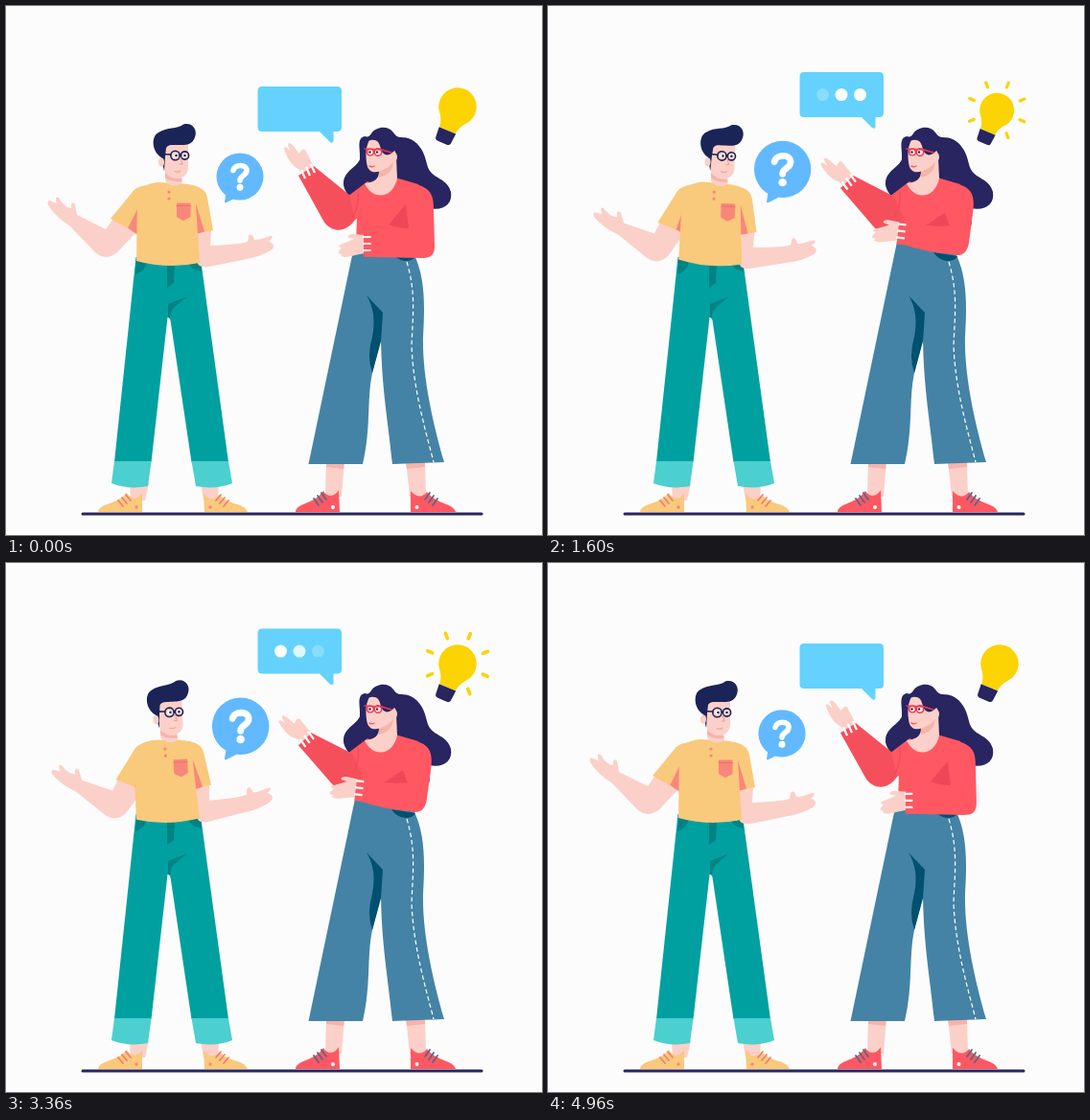
Write an HTML page that moves like this. It is 559 px wide and 552 px high and loops after 5000 ms.

```html
<!DOCTYPE html>
<html lang="en">
<head>
<meta charset="utf-8">
<title>Conversation</title>
<style>
  html, body { margin: 0; width: 100%; height: 100%; overflow: hidden; background: #fcfcfc; }
  svg { display: block; width: 100vw; height: 100vh; }
  .skin { fill: #fbd0c8; }
  .blush { fill: #f6b3aa; }
  .ink { fill: #282560; }
  .navy { fill: #1b2456; }
  .red { fill: #ff5862; }
  .rose { fill: #ee4757; }
  .sand { fill: #f9c97c; }
  .coral { fill: #f9867a; }
  .teal { fill: #00a0a0; }
  .pine { fill: #018284; }
  .mint { fill: #4bcfcf; }
  .denim { fill: #4483a5; }
  .deep { fill: #00506f; }
  .sky { fill: #62b9ff; }
  .white { fill: #fff; }
  .line { fill: none; stroke-linecap: round; stroke-linejoin: round; }
</style>
</head>
<body>
<svg viewBox="0 0 559 552" preserveAspectRatio="none">
  <path class="line" d="M80 530H496" stroke="#282560" stroke-width="3"/>

  <!-- man: legs -->
  <path class="skin" d="M129 498H149L145 516H130ZM203 498H222L221 516H206Z"/>
  <path class="sand" d="M96 528C98 518 115 521 126 508C131 517 139 514 142 508L142 528ZM207 528L206 508C210 515 217 517 223 510C232 521 248 518 252 528Z"/>
  <path class="line" d="M117 516l5 6M121 513l5 6M125 510l5 6M232 516l-5 6M228 513l-5 6M224 510l-5 6" stroke="#f47f72" stroke-width="1.8"/>
  <circle cx="136" cy="523" r="1.7" class="coral"/><circle cx="213" cy="523" r="1.7" class="coral"/>
  <path class="teal" d="M135.500 262L203 264L232 476H193.500L171.500 328Q170 323 168.500 325L151.500 476H113Z"/>
  <path class="mint" d="M113 475H151.500L148 501Q128 505 110 498ZM193.500 475H232L236 498Q219 505 198 501Z"/>
  <path class="pine" d="M136 264H147Q147 276 135 280ZM168 270H176L175 289L168 294ZM189 303L169 311V325L171 326Q171 317 177 313ZM189 266H203L204 277Q193 276 189 266Z"/>

  <!-- man: upper body -->
  <g id="manArm">
    <path class="skin" d="M113 220L104 233L74 218L72 207C70 203 67 206 68 211C62 210 58 205 55 200C52 198 51 201 53 206L45 203C43 204 43 207 45 209C50 217 57 223 66 229L93 257C100 264 110 263 116 257L135 237Z"/>
    <path class="coral" d="M139 204L126 231L139 240Z"/>
    <path class="sand" d="M148 187C139 188 135 190 132 194L109 222L127 232L140 206Z"/>
  </g>
  <g id="man">
    <path class="skin" d="M200 236L214 234L213 250C230 249 242 249 252 246L253 240C255 237 258 239 259 244C266 244 271 241 276 240C279 240 278 243 274 245L278 248C280 250 279 253 276 255C266 261 258 263 246 265L212 272C204 273 200 271 200 268Z"/>
    <path class="sand" d="M158 184C149 185 142 188 137 195L136 266Q168 275 202 268L200 237L216 234L210 200C208 190 200 187 182 185Z"/>
    <path class="coral" d="M198 206L207 235.500L200 237.500Z"/>
    <path class="coral" d="M178 205.500H192.500V220L185 224L178 220Z"/>
    <path class="line" d="M178 208.500H192.500" stroke="#ef7268"/>
    <circle cx="170" cy="194" r="1.6" class="coral"/><circle cx="170" cy="201" r="1.6" class="coral"/>
    <path class="skin" d="M166 168L166 182C170 189 181 189 184 184L183 174Z"/>
    <path class="blush" d="M166 174Q172 181 183 180L183 183Q171 184 166 179Z"/>
    <path class="skin" d="M160 146L162 160C163 171 169 179 176 180C185 180 190 176 190 168V142Z"/>
    <path class="navy" d="M162 158C152 152 151 136 159 132C168 126 178 129 185 123.500C195 121 200 130 197 137C194 146 186 145 180 145C174 145 169 144 167 148L166 157L165 172Z"/>
    <ellipse cx="162" cy="163" rx="3" ry="4.500" class="skin"/>
    <ellipse cx="177" cy="156" rx="2.600" ry="2" class="white"/><ellipse cx="186.500" cy="156" rx="2.400" ry="2" class="white"/>
    <g class="line" stroke="#1b2456" stroke-width="1.6">
      <circle cx="176.500" cy="156" r="4.700"/><circle cx="186.500" cy="156" r="4.100"/>
      <path d="M162 154.500L172 155M181 155.500h1.500"/>
    </g>
    <circle cx="177.500" cy="156" r="1.300" class="navy"/><circle cx="186.500" cy="156" r="1.300" class="navy"/>
    <path class="line" d="M182 158l2 7h-3M176 172.500q4 1.500 6-.500" stroke="#f0a299" stroke-width="1.1"/>
  </g>

  <!-- woman: hair and legs -->
  <path class="ink" d="M369 160C370 150 365 138 374 136C378 137 379 136 381 133C386 126 398 124 404 132C406 135 408 137 412 137C428 137 436 150 439 165C443 182 459 177 464 194C466 207 456 214 441 211Q445 228 436 240L380 212C364 208 351 194 352 184C353 172 366 168 369 160Z"/>
  <path class="skin" d="M334 474H353L350 512H333ZM417 474H437L438 512H421Z"/>
  <path class="blush" d="M334 476H353L352 483L334 481ZM417 476H437V481L418 483Z"/>
  <path class="red" d="M302 528C303 518 320 521 331 506C336 514 344 511 347 505L348 528ZM422 528L422 506C427 512 434 514 439 507C450 521 466 518 469 528Z"/>
  <path class="line" d="M321 514l5 7M325 511l5 7M329 508l5 7M450 514l-5 7M446 511l-5 7M442 508l-5 7" stroke="#53698c" stroke-width="1.8"/>
  <circle cx="341" cy="523" r="2" class="white"/><circle cx="428.500" cy="523" r="2" class="white"/>
  <path class="denim" d="M364 246L425 258C437 282 437 310 435 345C434 385 445 435 457 476L403 478C398 430 392 400 391 348L382 383C376 412 381 440 372 478H315.500Z"/>
  <path class="deep" d="M376 302L393 320L391 350L382 383Q376 366 382 345Q387 320 376 302ZM402 257L427 261Q425 266 416 266Q407 265 402 257Z"/>
  <path d="M418 267C428 300 424 325 423 355C425 400 436 437 446 476" fill="none" stroke="#fff" stroke-width="1.2" stroke-dasharray="4.500 3"/>

  <!-- woman: upper body -->
  <path class="red" d="M377 183L356 199L350 230L366 222L365 247Q395 258 425 259L436 215L430 186L406 179L392 190Z"/>
  <g id="foreArm">
    <path class="skin" d="M313 182L305 170C297 166 293 158 290 149C290 146 293 147 296 151C296 147 292 144 296 143C300 145 303 151 306 154C308 149 312 148 313 152C316 158 319 163 323 172Z"/>
    <path fill="#f54f5c" d="M305 177L321 167L358 197L364 223C354 238 338 236 331 224Z"/>
    <path d="M308 171l4 9M313 168l4 9M318 165l4 9" stroke="#fff" stroke-width="2.300"/>
  </g>
  <path class="line" d="M367 193Q369 206 362 220" stroke="#ee4757" stroke-width="1"/>
  <path id="arm" class="red"/>
  <path id="fold" class="rose"/>
  <g id="wrist">
    <path class="skin" d="M374 239L362 238C357 238 355 241 358 242L363 243L349 249C346 250 347 252 350 252L347 256C346 259 349 259 351 259L349 260C350 263 358 262 364 260L374 258Z"/>
    <path class="red" d="M373 239L383 239V262H373Z"/>
    <path d="M372 241h8.500M372 248h8.500M372 255h8.500" stroke="#fff" stroke-width="2.200"/>
  </g>
  <path class="skin" d="M389 166L407 158L408 180C403 203 381 202 374 185C384 184 389 181 389 172Z"/>
  <path class="blush" d="M389 172Q399 169 404 162Q403 176 389 179Z"/>
  <path class="skin" d="M380 138C375 146 375 155 376 163C377 173 383 175 391 172C399 169 405 164 407 155L400 137Z"/>
  <path class="ink" d="M377 141C387 137 390 143 391 150C394 157 400 157 405 151L411 153L411 138L395 129L379 137Z"/>
  <ellipse cx="404.500" cy="157.500" rx="3.500" ry="5" class="skin"/>
  <circle cx="380" cy="152.500" r="2" class="white"/><circle cx="387.500" cy="152.500" r="2.200" class="white"/>
  <g class="line" stroke="#f0384f" stroke-width="1.400">
    <circle cx="380" cy="152.500" r="3.400"/><circle cx="388" cy="152.500" r="3.800"/>
    <path d="M374 149L392 150L402 153"/>
  </g>
  <circle cx="379.500" cy="152.500" r="1.200" class="ink"/><circle cx="387" cy="152.500" r="1.200" class="ink"/>
  <path class="line" d="M379 167q3 1.500 5 0" stroke="#ee6570" stroke-width="1.500"/>

  <!-- question -->
  <path class="sky" d="M231 186L228 204Q228 206 230 205L240 200Z"/>
  <g id="ask">
    <circle cx="244" cy="178" r="24.500" class="sky"/>
    <path class="line" d="M237 171.500C238.500 164.500 251 165 251 171.500C251 177.500 244 176.500 244 182" stroke="#fff" stroke-width="5.600"/>
    <circle cx="244" cy="189.300" r="3.500" class="white"/>
  </g>

  <!-- speech -->
  <g id="talk">
    <path d="M267 84H345.500Q350 84 350 88.500V126.500Q350 131 345.500 131H341.500V141Q341 144 338 142L327 131H267Q262.500 131 262.500 126.500V88.500Q262.500 84 267 84Z" fill="#64d2fc"/>
    <g id="dots" class="white"></g>
  </g>

  <!-- idea -->
  <g id="idea">
    <g transform="translate(471 105) rotate(23)">
      <g id="rays" class="line" stroke="#fcd303" stroke-width="3.600"></g>
      <path d="M-18.500 7C-13 16 -10 18 -9 27H9C10 18 13 16 18.500 7Z" fill="#fcd303"/>
      <circle r="19.700" fill="#fcd303"/>
      <path class="ink" d="M-9.500 27H9.500L8.500 38.500Q8 41 5 41H-5Q-8 41 -8.500 38.500Z"/>
    </g>
  </g>
</svg>
<script>
const LOOP = 5000, DOT_LOOP = 2600;
const $ = id => document.getElementById(id);
const clamp = v => Math.min(1, Math.max(0, v));
const smooth = v => v * v * (3 - 2 * v);
const part = (t, start, length) => clamp((t - start) / length);

// Value at t from [time, value] steps, eased between neighbours.
function track(t, steps, ease = smooth) {
  for (let i = 1; i < steps.length; i++) {
    const [t0, a] = steps[i - 1], [t1, b] = steps[i];
    if (t <= t1) return a + (b - a) * ease(part(t, t0, t1 - t0));
  }
  return steps[steps.length - 1][1];
}

function add(parent, tag, attrs) {
  const el = document.createElementNS('http://www.w3.org/2000/svg', tag);
  for (const k in attrs) el.setAttribute(k, attrs[k]);
  return parent.appendChild(el);
}

const dots = [0, 1, 2].map(i => add($('dots'), 'circle', { cx: 286.5 + 19.5 * i, cy: 107.5, r: 6.5 }));
for (let k = 0; k < 8; k++) {
  if (k !== 2) add($('rays'), 'path', { d: 'M28.500 0H34', transform: `rotate(${k * 45})` });
}

// Blends two path strings that share the same structure.
function blend(a, b) {
  const end = b.match(/[\d.]+/g);
  return s => {
    let i = 0;
    return a.replace(/[\d.]+/g, n => (+n + (end[i++] - n) * s).toFixed(2));
  };
}
const armShape = blend(
  'M404 182 L428 186 C445 191 446 200 446 213 L447 250 C447 260 443 263 434 263 L381 262 L380 240 L405 236 Z',
  'M404 182 L428 186 C443 190 445 200 442 217 L436 247 C433 258 427 261 418 258 L369 244 L371 224 L397 230 Z');
const foldShape = blend('M417 207 L399 228 Q409 232 420 232 Z', 'M413 219 L393 229 Q406 230 418 228 Z');

const move = (id, value) => $(id).setAttribute('transform', value);
const zoom = (id, k, x, y) => move(id, `translate(${x} ${y}) scale(${k}) translate(${-x} ${-y})`);

const LEAN = [[0, 0], [1400, 2.66], [3250, -3.07], [LOOP, 0]];
const LIFT = [[0, 0], [250, 0], [2200, 1], [2700, 1], [LOOP, 0]];
const SWAY = [[0, 0], [2300, 1], [2700, 1], [LOOP, 0]];
const GROW = [[0, 1], [2500, 1.327], [LOOP, 1]];
const POP = [[0, 1], [1160, 1], [1620, .91], [2160, 1.2], [2850, 1], [LOOP, 1]];
const GLOW = [[0, 0], [740, 0], [1160, 1], [3560, 1], [4440, 0], [LOOP, 0]];

function draw(t) {
  const sway = track(t, SWAY, v => (v + smooth(v)) / 2);
  move('man', `rotate(${track(t, LEAN)} 170 270)`);
  move('manArm', `rotate(${-10 * sway} 142 182)`);
  move('foreArm', `translate(${10 * sway} ${4 * sway}) rotate(${-16 * sway} 350 218)`);
  move('wrist', `translate(${-11 * sway} ${-17 * sway}) rotate(${9 * sway} 381 250)`);
  $('arm').setAttribute('d', armShape(sway));
  $('fold').setAttribute('d', foldShape(sway));
  zoom('ask', track(t, GROW, v => v), 241, 214);
  move('talk', `translate(0 ${-19.3 * track(t, LIFT)})`);
  zoom('idea', track(t, POP), 440, 146);
  $('rays').setAttribute('opacity', track(t, GLOW));
  const d = t % DOT_LOOP;
  dots.forEach((dot, i) => dot.setAttribute('opacity',
    part(d, 60 + 290 * i, 510) * (1 - part(d, 1280 + 320 * i, 420))));
}

function tick() {
  draw(performance.now() % LOOP);
  requestAnimationFrame(tick);
}
tick();
</script>
</body>
</html>
```
